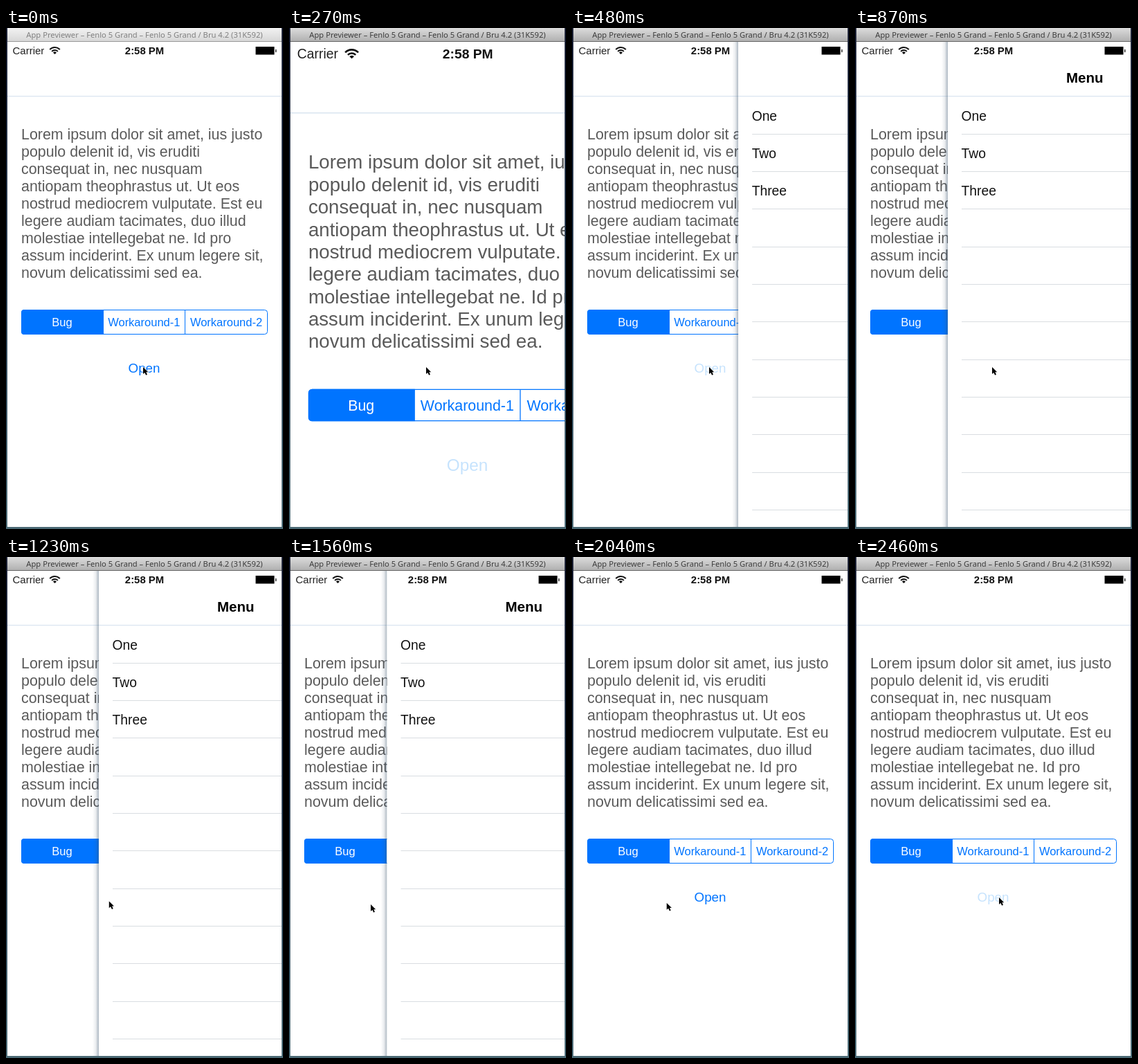
These frames come from a looping animation (400x724 px, 2490 ms). An HTML page with a canvas:

```html
<!DOCTYPE html>
<html lang="en">
<head>
<meta charset="utf-8">
<style>
  html, body { margin: 0; width: 100%; height: 100%; overflow: hidden; }
  canvas { display: block; }
</style>
</head>
<body>
<canvas id="stage" width="400" height="724"></canvas>
<script>
const ctx = document.getElementById('stage').getContext('2d');
const LOOP = 2490;
const BLUE = '#0074ff', PALE = '#c6e3fd', LINE = '#d9e4f0';
const SANS = '"Liberation Sans", Arial, sans-serif';
const OPEN_X = 134, CLOSED_X = 398, SLIDE = 297;
const PRESS = 60, ZOOM = [240, 300], SHOW = 313, HIDE = 1531, PRESS_AGAIN = 2430;
const BODY = [
  'Lorem ipsum dolor sit amet, ius justo',
  'populo delenit id, vis eruditi',
  'consequat in, nec nusquam',
  'antiopam theophrastus ut. Ut eos',
  'nostrud mediocrem vulputate. Est eu',
  'legere audiam tacimates, duo illud',
  'molestiae intellegebat ne. Id pro',
  'assum inciderint. Ex unum legere sit,',
  'novum delicatissimi sed ea.'
];

// Eased progress from 0 to 1 over a time span
function ease(t, start, length) {
  const p = Math.min(1, Math.max(0, (t - start) / length));
  return p * p * (3 - 2 * p);
}

function rect(x, y, w, h, fill) {
  ctx.fillStyle = fill;
  ctx.fillRect(x, y, w, h);
}

function text(str, x, y, size, fill, align = 'left', weight = '', family = SANS) {
  ctx.font = `${weight} ${size}px ${family}`;
  ctx.textAlign = align;
  ctx.fillStyle = fill;
  ctx.fillText(str, x, y);
}

function gradient(x0, y0, x1, y1, ...colors) {
  const g = ctx.createLinearGradient(x0, y0, x1, y1);
  colors.forEach((c, i) => g.addColorStop(i / (colors.length - 1), c));
  return g;
}

function drawWindow(active) {
  rect(0, 0, 400, 724, gradient(0, 0, 0, 724, '#1b2033', '#263b50', '#4b6a75'));
  rect(2, 0, 396, 20, active ? gradient(0, 0, 0, 20, '#dcdcdc', '#aeaeae')
                             : gradient(0, 0, 0, 20, '#f2f2f2', '#d6d6d6'));
  rect(2, 19, 396, 1, active ? '#666' : '#999');
  text('App Previewer – Fenlo 5 Grand – Fenlo 5 Grand / Bru 4.2 (31K592)', 200, 14, 11.2,
    active ? '#3c3c3c' : '#808080', 'center', '', '"Noto Sans", sans-serif');
}

function drawStatus() {
  text('Carrier', 9.5, 38, 15, '#222');
  text('2:58 PM', 200, 38, 14.9, '#111', 'center', 'bold');
  ctx.strokeStyle = '#111';
  ctx.lineWidth = 2;
  for (const r of [6, 10]) {
    ctx.beginPath();
    ctx.arc(70.5, 38, r, -Math.PI * 0.76, -Math.PI * 0.24);
    ctx.stroke();
  }
  ctx.fillStyle = '#111';
  ctx.beginPath();
  ctx.moveTo(70.5, 38);
  ctx.arc(70.5, 38, 3.5, -Math.PI * 0.76, -Math.PI * 0.24);
  ctx.fill();
  rect(360.5, 27, 27, 11.5, '#000');
  rect(389, 31, 1.5, 4, '#333');
}

function drawPage(pressed) {
  rect(2, 20, 396, 701, '#fff');
  rect(2, 98, 396, 1.2, LINE);
  BODY.forEach((line, i) => text(line, 22, 161 + i * 25, 21.4, '#5a5a5a'));

  ctx.beginPath();
  ctx.roundRect(22.5, 407.5, 355, 35, 4);
  ctx.strokeStyle = BLUE;
  ctx.lineWidth = 1;
  ctx.stroke();
  ctx.beginPath();
  ctx.roundRect(22, 407, 119, 36, [4, 0, 0, 4]);
  ctx.fillStyle = BLUE;
  ctx.fill();
  rect(258, 408, 1, 34, BLUE);
  text('Bug', 81, 431, 16.5, '#fff', 'center');
  text('Workaround-1', 199.3, 431, 16.5, BLUE, 'center');
  text('Workaround-2', 318, 431, 16.5, BLUE, 'center');
  text('Open', 199.5, 498, 18.8, pressed ? PALE : BLUE, 'center');
}

function drawMenu(x) {
  rect(x - 9, 20, 9, 701, gradient(x - 9, 0, x, 0, 'rgba(60,85,110,0)', 'rgba(60,85,110,.1)', 'rgba(60,85,110,.42)'));
  rect(x, 20, 400 - x, 701, '#fff');
  rect(x, 98, 400 - x, 1.2, LINE);
  text('Menu', x + 171, 79, 20.5, '#000', 'left', 'bold');
  ['One', 'Two', 'Three'].forEach((item, i) => text(item, x + 19.5, 133.5 + i * 54.3, 19.3, '#111'));
  for (let i = 0; i < 11; i++) rect(x + 20, Math.round(152.8 + i * 54.3), 400, 1, '#d9dde1');
}

function drawCursor(t) {
  const away = ease(t, 1000, 400), back = ease(t, 1900, 480);
  ctx.save();
  ctx.translate(198 - 80 * away + 90 * back, 490 + 12 * away - 10 * back);
  ctx.scale(0.9, 0.9);
  ctx.fillStyle = '#000';
  ctx.strokeStyle = '#fff';
  ctx.lineWidth = 1.4;
  const arrow = new Path2D('M0 0V11L2.6 8.8L4.6 13L6.6 12L4.8 8H8Z');
  ctx.stroke(arrow);
  ctx.fill(arrow);
  ctx.restore();
}

function draw(t) {
  const zoomed = t >= ZOOM[0] && t < ZOOM[1];
  const pressed = t >= PRESS && t < HIDE + SLIDE || t >= PRESS_AGAIN;
  const shown = ease(t, SHOW, SLIDE) - ease(t, HIDE, SLIDE);

  drawWindow(t >= PRESS);
  ctx.save();
  ctx.beginPath();
  ctx.rect(2, 20, 396, 701);
  ctx.clip();
  if (zoomed) {
    ctx.translate(2, 21);
    ctx.scale(1.294, 1.294);
    ctx.translate(-2, -20);
    rect(2, 19, 396, 1, '#fff');
  }
  drawPage(pressed);
  if (shown > 0) drawMenu(CLOSED_X + (OPEN_X - CLOSED_X) * shown);
  drawStatus();
  ctx.restore();
  drawCursor(t);
}

const start = performance.now();
function tick() {
  draw((performance.now() - start) % LOOP);
  requestAnimationFrame(tick);
}
tick();
</script>
</body>
</html>
```
